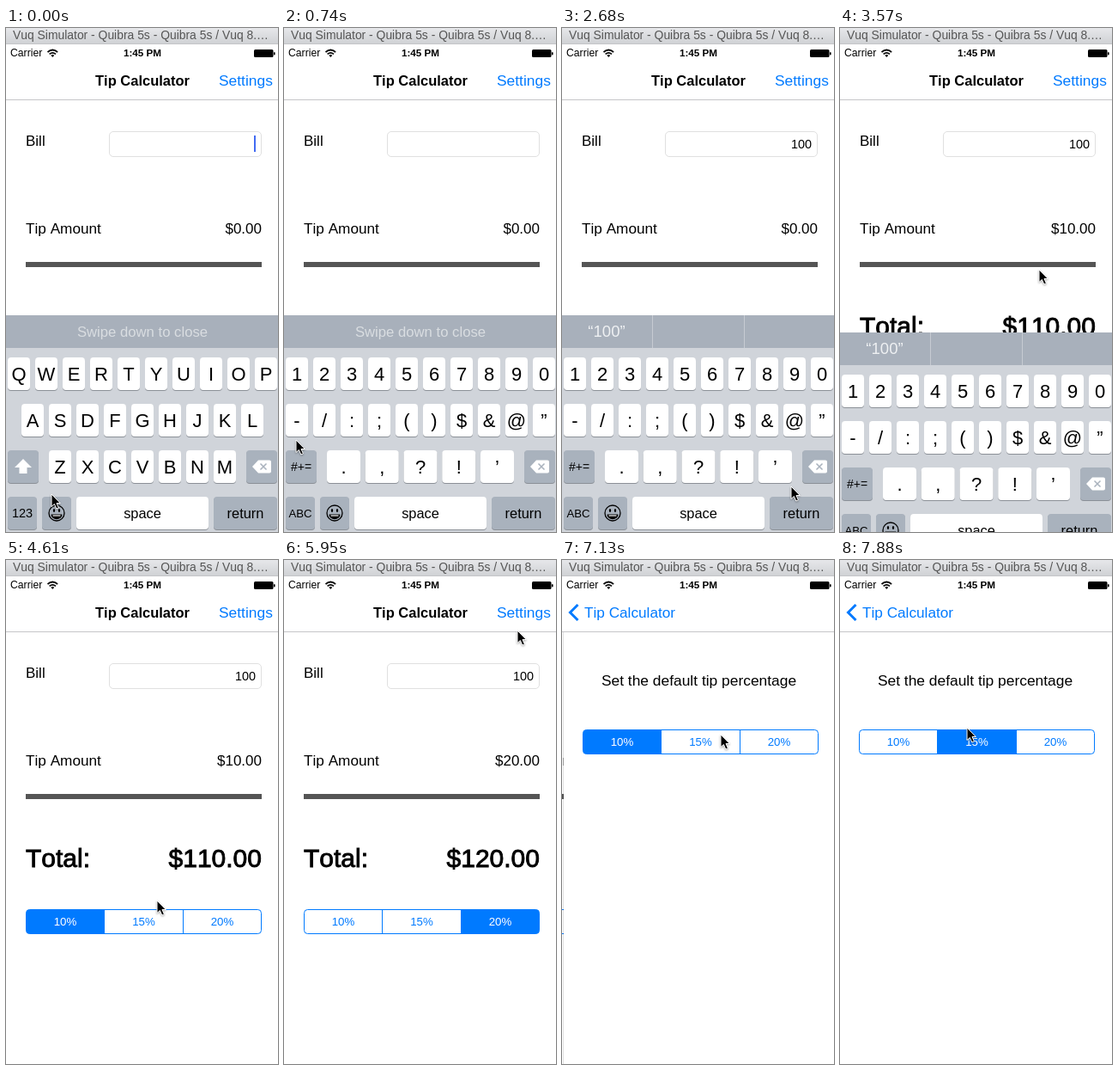
An HTML page that plays this animation: 317x586 px, repeating every 8 s.

```html
<!DOCTYPE html>
<html lang="en">
<head>
<meta charset="utf-8">
<title>Tip Calculator</title>
<style>
html, body { margin: 0; width: 100%; height: 100%; overflow: hidden; background: #fff; }
svg { display: block; width: 317px; height: 586px; }
text { font-family: "Liberation Sans", Arial, sans-serif; font-kerning: none; white-space: pre; }
#pointer { filter: drop-shadow(0 1px 1px rgba(0, 0, 0, .35)); }
</style>
</head>
<body>
<svg id="stage" viewBox="0 0 317 586"></svg>
<script>
const NS = 'http://www.w3.org/2000/svg';
const LOOP = 8000, STEP = 148.7, BLUE = '#007aff', GRAY = '#a9b2bd';
const stage = document.getElementById('stage');

function el(tag, attrs, parent = stage) {
  const node = document.createElementNS(NS, tag);
  set(node, attrs);
  parent.appendChild(node);
  return node;
}
function set(node, attrs) {
  for (const k in attrs) node.setAttribute(k, attrs[k]);
}
const group = (parent = stage) => el('g', {}, parent);
const rect = (parent, x, y, width, height, fill, more = {}) =>
  el('rect', { x, y, width, height, fill, ...more }, parent);
function label(parent, x, y, str, size, more = {}) {
  const node = el('text', { x, y, 'font-size': size, fill: '#000', ...more }, parent);
  node.textContent = str;
  return node;
}
const MID = { 'text-anchor': 'middle' }, END = { 'text-anchor': 'end' };
const show = (node, on) => set(node, { visibility: on ? 'visible' : 'hidden' });
const move = (node, x, y = 0) => set(node, { transform: `translate(${x} ${y})` });

// Segmented control; returns a function that picks one segment
function segments(parent, x, y) {
  const outline = 'M4 0H270a4 4 0 0 1 4 4V24a4 4 0 0 1 -4 4H4a4 4 0 0 1 -4 -4V4a4 4 0 0 1 4 -4Z';
  const edges = [0, 91, 183, 274];
  const g = group(parent);
  move(g, x, y);
  const fills = [
    'M91 0H4a4 4 0 0 0 -4 4V24a4 4 0 0 0 4 4H91Z',
    'M91 0H183V28H91Z',
    'M183 0H270a4 4 0 0 1 4 4V24a4 4 0 0 1 -4 4H183Z'
  ].map(d => el('path', { d, fill: BLUE }, g));
  el('path', { d: outline + 'M91 0V28M183 0V28', fill: 'none', stroke: BLUE }, g);
  const names = ['10%', '15%', '20%'].map((s, i) =>
    label(g, (edges[i] + edges[i + 1]) / 2, 18.7, s, 13.3, MID));
  return pick => names.forEach((n, i) => {
    show(fills[i], i === pick);
    set(n, { fill: i === pick ? '#fff' : BLUE });
  });
}

// Calculator screen
const home = group();
rect(home, 0, 84, 317, 502, '#fff');
label(home, 23, 137, 'Bill', 17);
rect(home, 120.5, 120.5, 177, 29, '#fff', { rx: 4.5, stroke: '#e0e0e0' });
const bill = label(home, 291, 140, '', 14.4, END);
const caret = rect(home, 289, 125, 2, 19, '#426bf2');
label(home, 23, 239, 'Tip Amount', 17.2);
const tip = label(home, 298, 239, '', 17, END);
rect(home, 23, 272, 275, 6, '#555');
const heavy = { stroke: '#000', 'stroke-width': .9 };
label(home, 23, 356.5, 'Total:', 30, heavy);
const total = label(home, 298, 356.5, '', 30, { ...END, ...heavy });
const pickHome = segments(home, 23.5, 406.5);

// Settings screen
const prefs = group();
rect(prefs, -1, 84, 1, 502, '#000', { opacity: .12 });
rect(prefs, 0, 84, 317, 502, '#fff');
label(prefs, 157.5, 146, 'Set the default tip percentage', 17.4, MID);
const pickPrefs = segments(prefs, 22.5, 197.5);

// Keyboard
const board = group();
rect(board, 0, 334, 317, 252, '#d0d4da');
rect(board, 0, 334, 317, 38, '#a8b0bb');
const swipe = label(board, 159, 359, 'Swipe down to close', 16.7, { ...MID, fill: '#d9dde1' });
const guess = group(board);
rect(guess, 105, 334, 1, 38, '#c6cbd2');
rect(guess, 212, 334, 1, 38, '#c6cbd2');
const guessText = label(guess, 52, 359, '', 18.6, { ...MID, fill: '#eef0f2' });

function key(parent, x, y, w, str, size = 22, fill = '#fff') {
  rect(parent, x, y + 1, w, 38, '#8b9097', { rx: 4 });
  const face = rect(parent, x, y, w, 38, fill, { rx: 4 });
  label(parent, x + w / 2, y + 19 + size * .36, str, size, MID);
  return face;
}
const row = (parent, chars, x, y, w = 26, gap = 32) =>
  [...chars].forEach((c, i) => key(parent, x + i * gap, y, w, c));

const letters = group(board), digits = group(board);
row(letters, 'QWERTYUIOP', 2, 383);
row(letters, 'ASDFGHJKL', 18, 437);
row(letters, 'ZXCVBNM', 50, 491);
key(letters, 2, 491, 36, '', 14, GRAY);
el('path', { d: 'M20 501L30 511H24.500V518H15.500V511H10Z', fill: '#fff' }, letters);
const modeKey = key(letters, 2, 545, 34, '123', 14.5, GRAY);
row(digits, '1234567890', 2, 383);
row(digits, '-/:;()$&@”', 2, 437);
row(digits, '.,?!’', 50, 491, 39, 44.75);
key(digits, 2, 491, 36, '#+=', 14, GRAY);
key(digits, 2, 545, 34, 'ABC', 13.2, GRAY);

key(board, 280, 491, 36, '', 14, GRAY);
el('path', { d: 'M287 510L294 502.500H307a2 2 0 0 1 2 2V515.500a2 2 0 0 1 -2 2H294Z', fill: '#fff' }, board);
el('path', { d: 'M296.500 506.500l7 7m0 -7l-7 7', stroke: GRAY, 'stroke-width': 1.5 }, board);
key(board, 42, 545, 34, '', 14, GRAY);
el('circle', { cx: 59, cy: 564, r: 9, fill: 'none', stroke: '#000', 'stroke-width': 1.3 }, board);
for (const x of [56, 62]) el('ellipse', { cx: x, cy: 561, rx: 1.2, ry: 2 }, board);
el('path', { d: 'M52.500 565.500H65.500a6.500 5.800 0 0 1 -13 0Z' }, board);
el('path', { d: 'M54.500 567H63.500', stroke: '#fff', 'stroke-width': 1.2 }, board);
key(board, 82, 545, 154, 'space', 16.4);
key(board, 242, 545, 74, 'return', 16.4, GRAY);

function bubble(str, x, left) {
  const g = group(board);
  const d = `M${left + 5} 331h33q5 0 5 5v32q0 5 -4 8L${x + 26} 383v34q0 4 -4 4h-18q-4 0 -4 -4v-34L${left + 4} 376q-4 -3 -4 -8v-32q0 -5 5 -5Z`;
  el('path', { d, fill: '#fcfcfd', stroke: '#b9bec5', 'stroke-width': .6 }, g);
  label(g, left + 21.5, 368, str, 32, MID);
  return g;
}
const bubbleOne = bubble('1', 2, 1), bubbleZero = bubble('0', 290, 273);

// Navigation and status bars
rect(stage, 0, 18, 317, 65, '#fff');
rect(stage, 0, 83, 317, 1, '#c6c6c9');
const heading = label(stage, 159, 67, 'Tip Calculator', 16.5, { ...MID, 'font-weight': 700 });
const settings = label(stage, 248, 67, 'Settings', 17.4, { fill: BLUE });
const chevron = el('path', { d: 'M18.500 52L9.500 61L18.500 70', fill: 'none', stroke: BLUE, 'stroke-width': 3 });
const back = label(stage, 26, 67, 'Tip Calculator', 17.2, { fill: BLUE });

label(stage, 5, 33, 'Carrier', 12.2);
el('path', { d: 'M48.500 28q5.800 -5 11.600 0M50.600 30.300q3.700 -3 7.400 0', fill: 'none', stroke: '#000', 'stroke-width': 1.7 });
el('path', { d: 'M54.300 34l-2 -2.300q2 -1.500 4 0Z' });
label(stage, 159, 33, '1:45 PM', 11.7, { ...MID, 'font-weight': 700 });
rect(stage, 289, 25, 22.5, 9, '#000', { rx: 1.5 });
rect(stage, 312, 28, 1.6, 3.5, '#000', { rx: .8 });

const shade = el('linearGradient', { id: 'shade', x2: 0, y2: 1 }, el('defs', {}));
el('stop', { offset: 0, 'stop-color': '#e6e7ea' }, shade);
el('stop', { offset: 1, 'stop-color': '#d0d2d5' }, shade);
rect(stage, 0, 0, 317, 18, 'url(#shade)');
rect(stage, 0, 18, 317, 1, '#c4c5c8');
label(stage, 8, 13, 'Vuq Simulator - Quibra 5s - Quibra 5s / Vuq 8.…', 13.9, { fill: '#555' });

const pointer = el('path', {
  id: 'pointer',
  d: 'M-1 -1V13.500L2.400 10.500L4.800 16L7.400 14.900L5 9.500H9.300Z',
  stroke: '#fff', 'stroke-width': 1, 'stroke-linejoin': 'round'
});

// Pointer path: step, x, y
const path = [
  [0, 54, 543], [2, 20, 560], [3, 18, 561], [5, 15, 480], [7, 13, 401], [8, 13, 400],
  [10, 305, 390], [11, 303, 396], [14, 303, 397], [15, 300, 410], [18, 268, 534],
  [20, 252, 400], [22, 235, 286], [24, 233, 282], [28, 233, 282], [29, 229, 294],
  [31, 177, 397], [32, 162, 414], [33, 161, 416], [35, 250, 415], [36, 251, 414],
  [38, 262, 260], [40, 273, 83], [42, 296, 6], [43, 284, 50], [44, 280, 57],
  [45, 278, 60], [48, 186, 204], [50, 160, 213], [52, 156, 213], [53, 149, 196], [54, 149, 196]
];
function pointerAt(n) {
  const i = path.findIndex(p => p[0] > n);
  const a = path[i - 1], b = path[i], f = (n - a[0]) / (b[0] - a[0]);
  return [1, 2].map(k => Math.round(a[k] + (b[k] - a[k]) * f));
}

// Critically damped spring from 0 to 1
function spring(ms, rate) {
  const x = Math.max(0, ms) / 1000 * rate;
  const p = 1 - (1 + x) * Math.exp(-x);
  return p > .996 ? 1 : p;
}
const money = v => '$' + v.toFixed(2);

function draw(n) {
  const ms = n * STEP;
  const typed = n < 9 ? '' : n < 12 ? '1' : n < 14 ? '10' : '100';
  const pick = n < 33 ? 0 : n < 36 ? 1 : 2;
  const base = n < 23 ? 0 : 100;
  const due = base * (10 + pick * 5) / 100;

  bill.textContent = typed;
  tip.textContent = money(due);
  total.textContent = money(base + due);
  pickHome(pick);
  pickPrefs(n < 52 ? 0 : 1);
  show(caret, n < 23 && n % 7 < 4);

  move(board, 0, Math.round(252 * spring(ms - 3536, 14)));
  show(letters, n < 4);
  show(digits, n >= 4);
  set(modeKey, { fill: n === 3 ? '#fff' : GRAY });
  show(swipe, !typed);
  show(guess, typed);
  guessText.textContent = `“${typed}”`;
  show(bubbleOne, n === 8);
  show(bubbleZero, n === 11 || n === 13);

  const push = spring(ms - 6600, 13.8);
  const fade = Math.max(0, 1 - push * 1.6);
  move(home, Math.round(-96 * push));
  move(prefs, Math.round(318 * (1 - push)));
  move(heading, Math.round(-80 * push));
  set(heading, { opacity: fade });
  set(settings, { opacity: n === 44 ? .3 : fade });
  move(back, Math.round(80 * (1 - push)));
  set(back, { opacity: push });
  set(chevron, { opacity: push });

  move(pointer, ...pointerAt(n));
}

// The screen refreshes about seven times a second
let last = -1;
function tick() {
  const n = Math.min(53, Math.floor((performance.now() % LOOP + 8) / STEP));
  if (n !== last) draw(last = n);
  requestAnimationFrame(tick);
}
tick();
</script>
</body>
</html>
```
